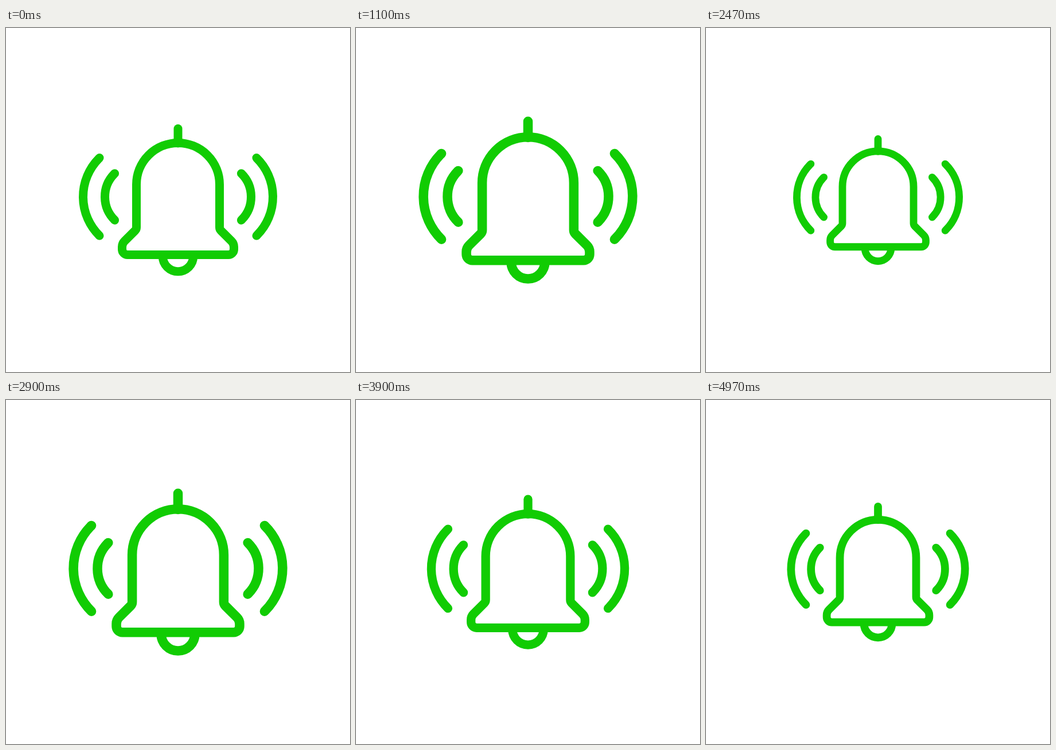
An HTML page with a canvas for the animation above (5.01 s loop, 600 by 600 pixels).

```html
<!DOCTYPE html>
<html lang="en">
<head>
<meta charset="utf-8">
<title>Ringing bell</title>
<style>
  html, body { margin: 0; width: 100%; height: 100%; overflow: hidden; background: #fff; }
  canvas { display: block; width: 600px; height: 600px; }
</style>
</head>
<body>
<canvas id="stage" width="600" height="600"></canvas>
<script>
const ctx = document.getElementById('stage').getContext('2d');
const LOOP = 5010, STEPS = 150;
const RISE = 300, FALL = 600;   // one pulse, in ms
const LOW = 0.85, HIGH = 1.15;

// Linear swell, then an ease-out shrink; the loop starts mid-swell.
function pulse(ms) {
  const p = (ms + RISE / 2) % (RISE + FALL);
  const u = p < RISE ? p / RISE : 1 - (p - RISE) / FALL;
  return LOW + (HIGH - LOW) * (p < RISE ? u : u * u);
}

// 30 steps per second, on a 10 ms clock.
function stepAt(ms) {
  const tick = Math.floor(ms / 10) * 10;
  return Math.min(STEPS - 1, Math.floor((tick + 5) * 0.03));
}

// Everything below is relative to the centre of the stage.
function bell() {
  ctx.beginPath();
  ctx.moveTo(0, 95.5);
  ctx.arcTo(-97.5, 95.5, -97.5, 76, 9.5);
  ctx.arcTo(-97.5, 76, -72.5, 51, 14);
  ctx.arcTo(-72.5, 51, -72.5, 0, 8);
  ctx.lineTo(-72.5, -27);
  ctx.arc(0, -27, 72.5, Math.PI, 0);
  ctx.arcTo(72.5, 51, 97.5, 76, 8);
  ctx.arcTo(97.5, 76, 97.5, 95.5, 14);
  ctx.arcTo(97.5, 95.5, 0, 95.5, 9.5);
  ctx.closePath();
  ctx.stroke();

  ctx.beginPath();
  ctx.moveTo(0, -124.5);
  ctx.lineTo(0, -99);
  ctx.stroke();

  ctx.beginPath();
  ctx.arc(0, 98, 26.7, 0, Math.PI);
  ctx.stroke();
}

function wave(side, r) {
  const spread = 0.796;
  const mid = side > 0 ? 0 : Math.PI;
  ctx.beginPath();
  ctx.arc(side * 70.5, -5.6, r, mid - spread, mid + spread);
  ctx.stroke();
}

function draw(ms) {
  const s = pulse(stepAt(ms) * 100 / 3);
  ctx.setTransform(1, 0, 0, 1, 0, 0);
  ctx.fillStyle = '#fff';
  ctx.fillRect(0, 0, 600, 600);
  ctx.setTransform(s, 0, 0, s, 300, 300);
  ctx.strokeStyle = '#11cc03';
  ctx.lineWidth = 15;
  ctx.lineCap = 'round';
  ctx.lineJoin = 'round';
  bell();
  for (const side of [-1, 1]) {
    wave(side, 57);
    wave(side, 95);
  }
}

const start = performance.now();
function loop() {
  draw((performance.now() - start) % LOOP);
  requestAnimationFrame(loop);
}
loop();
</script>
</body>
</html>
```
